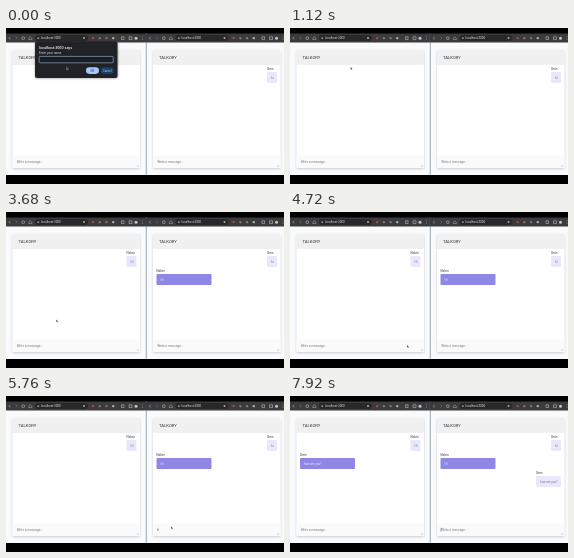
An HTML page for the animation above (8000 ms loop, 278x156 px).

```html
<!DOCTYPE html>
<html lang="en">
<head>
<meta charset="utf-8">
<title>Two chat windows</title>
<style>
html, body { margin: 0; width: 100%; height: 100%; overflow: hidden; background: #000; }
svg { display: block; width: 100%; height: 100%; font-family: Roboto, Arial, sans-serif; }
</style>
</head>
<body>
<svg id="stage" viewBox="0 0 278 156"></svg>
<script>
const LOOP = 8000;
const SHIFT = 140.5;
const HINT = 'Write a message...';
const LEFT_NAME = 'Nelvin', RIGHT_NAME = 'Orrin';
const stage = document.getElementById('stage');

function add(parent, tag, attrs, text) {
  const el = document.createElementNS('http://www.w3.org/2000/svg', tag);
  for (const k in attrs) el.setAttribute(k, attrs[k]);
  if (text) el.textContent = text;
  parent.appendChild(el);
  return el;
}
const rect = (p, x, y, width, height, fill, rx = 0, more = {}) =>
  add(p, 'rect', { x, y, width, height, fill, rx, ...more });
const label = (p, x, y, size, fill, text, more = {}) =>
  add(p, 'text', { x, y, 'font-size': size, fill, ...more }, text);
const line = (p, d, stroke, width = 0.6) =>
  add(p, 'path', { d, stroke, 'stroke-width': width, fill: 'none' });
const group = (p, x = 0) => add(p, 'g', { transform: `translate(${x} 0)` });
const show = (el, on) => el.setAttribute('visibility', on ? 'visible' : 'hidden');

const defs = add(stage, 'defs', {});
const blur = add(defs, 'filter', { id: 'soft', x: '-10%', y: '-10%', width: '120%', height: '120%' });
add(blur, 'feGaussianBlur', { stdDeviation: 1.1 });

function toolbar(g) {
  rect(g, 0, 5.5, 139.5, 9, '#3b3b3b');
  rect(g, 29, 7, 53, 6, '#282828', 3);
  const grey = '#b9b9b9';
  line(g, 'M4.2 8.8L2.8 10.2L4.2 11.6', grey);
  line(g, 'M9.8 8.8L11.2 10.2L9.8 11.6', '#777');
  add(g, 'circle', { cx: 17.3, cy: 10.2, r: 1.4, fill: 'none', stroke: grey, 'stroke-width': 0.6 });
  line(g, 'M22.8 10.2L24.3 8.8L25.8 10.2V11.6H22.8Z', grey, 0.5);
  add(g, 'circle', { cx: 32.3, cy: 10.2, r: 0.9, fill: '#999' });
  label(g, 35, 11.2, 3, '#ddd', 'localhost:3000');
  add(g, 'circle', { cx: 78, cy: 10.1, r: 1, fill: '#aaa' });
  ['#a34b52', '#9a6670', '#777', '#aaa'].forEach((c, i) => rect(g, 86 + i * 6.7, 9, 2.3, 2.3, c, 0.7));
  line(g, 'M115.5 8.8H118V11.6H115.5Z M123 8.8H126V11.6H123Z', grey);
  add(g, 'circle', { cx: 130, cy: 10.2, r: 1.5, fill: '#c5c5c5' });
  [8.7, 10.2, 11.7].forEach(cy => add(g, 'circle', { cx: 136.5, cy, r: 0.4, fill: grey }));
}

function chatWindow(x) {
  const g = group(stage, x);
  rect(g, 0, 14, 140, 133, '#f8fafc');
  toolbar(g);
  rect(g, 6.5, 23, 127.5, 118, '#aeb4bb', 1, { filter: 'url(#soft)', opacity: 0.65 });
  rect(g, 6.5, 22, 127.5, 118, '#fff', 1);
  rect(g, 6.5, 22, 127.5, 15, '#f0f0f0', 1);
  label(g, 12.5, 31, 4.2, '#333', 'TALKORY');
  rect(g, 6.5, 127.5, 127.5, 12.5, '#fafafa', 1);
  line(g, 'M130.8 138.7L132.6 136.9 M132 138.7L132.6 138.1', '#888', 0.35);
  const field = label(g, 10.7, 135, 3.2, '#777', HINT);
  const caret = line(g, 'M10.5 131.8V135.8', '#222', 0.4);
  return { g, field, caret };
}

function message(win, x, y, width, name, text, own) {
  const m = group(win.g);
  label(m, x, y - 1.7, 3, '#333', name);
  rect(m, x, y, width, 11, own ? '#e9e7fb' : '#8e87e6', 1);
  label(m, x + 4, y + 6.6, 3, own ? '#77758c' : '#f4f3ff', text);
  return m;
}

const left = chatWindow(0), right = chatWindow(SHIFT);
rect(stage, 139.5, 5.5, 1.2, 141.5, '#c7d5df');
rect(stage, 139.5, 5.5, 1.2, 9, '#111');

message(right, 120.5, 44, 10, RIGHT_NAME, 'hi', true);
const hello = [
  message(left, 120.5, 44, 10, LEFT_NAME, 'Hi', true),
  message(right, 10, 62, 55, LEFT_NAME, 'Hi', false)
];
const reply = [
  message(left, 10, 62, 55, RIGHT_NAME, 'how are you?', false),
  message(right, 105.5, 80, 25, RIGHT_NAME, 'how are you?', true)
];

const dialog = group(stage);
rect(dialog, 29, 14, 83, 36.5, '#000', 2, { filter: 'url(#soft)', opacity: 0.35 });
rect(dialog, 29, 13.5, 82.5, 36.5, '#202226', 2);
label(dialog, 33, 20.7, 3.7, '#f2f2f2', 'localhost:3000 says', { 'font-weight': 500 });
label(dialog, 33, 26, 3.1, '#ddd', 'Enter your name');
rect(dialog, 33.2, 28.4, 74, 6.4, '#1b1d20', 1, { stroke: '#9dbbe8', 'stroke-width': 0.6 });
const nameField = label(dialog, 34.5, 32.8, 3, '#eee', '');
rect(dialog, 80, 39.3, 13, 6.6, '#a8c7fa', 3.3);
label(dialog, 86.5, 43.7, 2.9, '#17365f', 'OK', { 'text-anchor': 'middle' });
rect(dialog, 94.5, 39.3, 13.5, 6.6, '#17406b', 3.3);
label(dialog, 101.2, 43.7, 2.9, '#b8d3f5', 'Cancel', { 'text-anchor': 'middle' });

const pointer = add(stage, 'path', { d: 'M0 0V2.6L0.7 2L1.3 3L1.8 2.7L1.3 1.8H2Z', fill: '#222', stroke: '#fff', 'stroke-width': 0.25 });

// Each entry is [time, value]; the value holds until the next entry.
const nameKeys = [[0, 0], [80, 1], [240, 2], [560, 3], [720, 4], [800, 5], [960, 6]];
const leftKeys = [[0, HINT], [2960, 'H'], [3120, 'Hi'], [3280, HINT]];
const rightKeys = [
  [0, HINT], [5760, 'h'], [5920, 'hi'], [6160, 'h'], [6240, HINT], [6400, 'h'],
  [6480, 'ho'], [6560, 'how'], [6640, 'how '], [6800, 'how a'], [6960, 'how ar'],
  [7120, 'how are'], [7280, 'how are y'], [7360, 'how are yo'], [7520, 'how are you'],
  [7680, 'how are you?'], [7920, HINT]
];
// Pointer path: [time, x, y].
const path = [
  [0, 60.5, 39], [2240, 60.5, 39], [2560, 40, 129], [3600, 40, 129], [3760, 60, 87],
  [3840, 60, 87], [4080, 122, 48], [4320, 230, 66], [4720, 117, 133],
  [4800, 117, 133], [5040, 65, 134], [5200, 65, 134], [5520, 165, 130.5], [8000, 165, 130.5]
];

function held(keys, t) {
  let value = keys[0][1];
  for (const [at, v] of keys) if (t >= at) value = v;
  return value;
}

function pointerAt(t) {
  const i = Math.max(1, path.findIndex(p => p[0] > t));
  const [t0, x0, y0] = path[i - 1], [t1, x1, y1] = path[i];
  const u = (t - t0) / (t1 - t0), k = u * u * (3 - 2 * u);
  return [x0 + (x1 - x0) * k, y0 + (y1 - y0) * k];
}

function fill(win, text) {
  win.field.textContent = text;
  win.field.setAttribute('fill', text === HINT ? '#777' : '#333');
}

function render(t) {
  show(dialog, t < 1120);
  nameField.textContent = LEFT_NAME.slice(0, held(nameKeys, t));
  fill(left, held(leftKeys, t));
  fill(right, held(rightKeys, t));
  show(left.caret, t >= 3280 && t < 3680);
  show(right.caret, t >= 7920);
  hello.forEach(m => show(m, t >= 3360));
  reply.forEach(m => show(m, t >= 7920));
  pointer.setAttribute('transform', `translate(${pointerAt(t).join(' ')})`);
  show(pointer, t < 5920);
}

const start = performance.now();
function tick() {
  render((performance.now() - start) % LOOP);
  requestAnimationFrame(tick);
}
tick();
</script>
</body>
</html>
```
